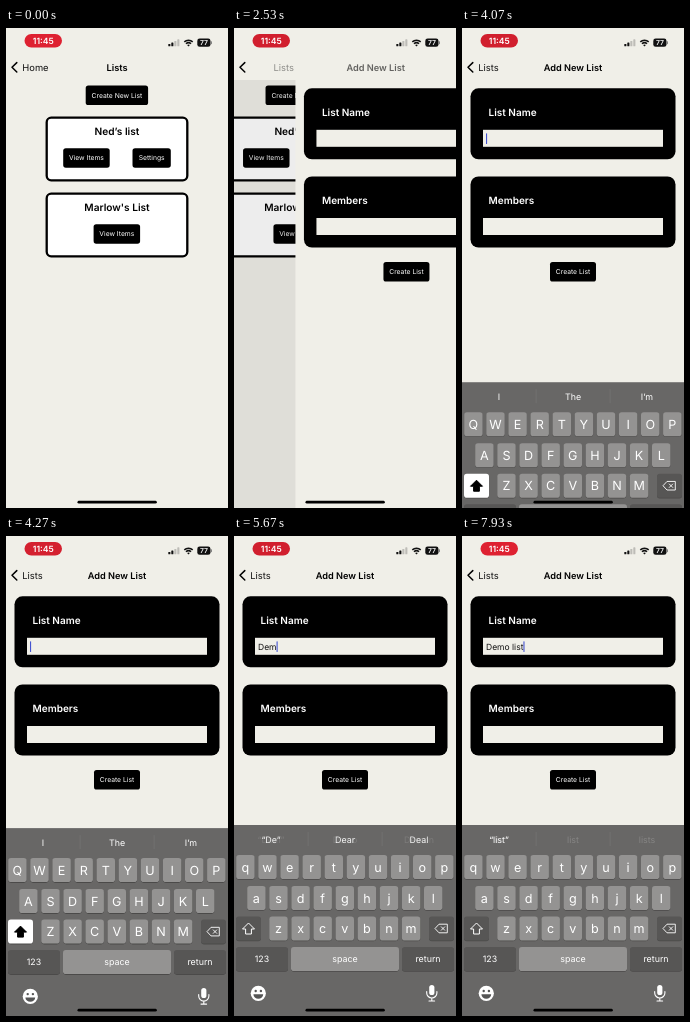
These frames come from a looping animation (222x480 px, 8 s). An HTML page:

```html
<!DOCTYPE html>
<html lang="en">
<head>
<meta charset="utf-8">
<title>Add New List</title>
<style>
  html, body { margin: 0; width: 100%; height: 100%; overflow: hidden; background: #f0efe8; }
  svg { display: block; width: 100vw; height: 100vh; }
  text { font-family: Inter, Roboto, sans-serif; white-space: pre; text-rendering: geometricPrecision; }
</style>
</head>
<body>
<svg id="stage" viewBox="0 0 222 480" preserveAspectRatio="none"></svg>
<script>
const LOOP = 8000, W = 222;
const CREAM = '#f0efe8', KEY = '#949392', DARK_KEY = '#575655';

// Markup helpers
const rect = (x, y, w, h, r, fill, extra = '') =>
  `<rect x="${x}" y="${y}" width="${w}" height="${h}" rx="${r}" fill="${fill}" ${extra}/>`;
const text = (x, y, str, size, fill = '#000', extra = 'text-anchor="middle"') =>
  `<text x="${x}" y="${y}" font-size="${size}" fill="${fill}" ${extra}>${str}</text>`;
const group = (id, body, extra = '') => `<g id="${id}" ${extra}>${body}</g>`;
const BOLD = 'font-weight="600" text-anchor="middle"';

const button = (x, y, w, label) =>
  rect(x, y, w, 19.5, 2.6, '#000') + text(x + w / 2, y + 12.2, label, 6.75, '#fff');
const listCard = (y, title) =>
  rect(40.7, y + 1.2, 140.6, 62.6, 4.5, '#fff', 'stroke="#000" stroke-width="2.3"') +
  text(111, y + 18, title, 10.15, '#000', BOLD);
const fieldCard = (y, title) =>
  rect(8.5, y, 205, 71, 8, '#000') +
  text(26.5, y + 27.4, title, 10, '#fff', 'font-weight="600"') +
  rect(21, y + 41.5, 180, 17, 0, CREAM);

const listsPage =
  rect(0, 0, W, 480, 0, CREAM) +
  group('createButton', button(79.7, 57.5, 62.4, 'Create New List')) +
  listCard(88.5, 'Ned’s list') + button(57.2, 120.2, 46.5, 'View Items') + button(126.5, 120.2, 38.3, 'Settings') +
  listCard(164.5, "Marlow's List") + button(87.6, 196.2, 46.5, 'View Items');

const addPage =
  rect(0, 0, W, 480, 0, CREAM) +
  fieldCard(60.3, 'List Name') + fieldCard(148.5, 'Members') +
  button(88, 234, 46, 'Create List') +
  text(24, 113.8, '', 8.5, '#111', 'id="typed"') +
  rect(24, 105.3, 1.1, 10.8, 0.5, '#4454d0', 'id="caret"');

const navBar =
  rect(0, 0, W, 52, 0, CREAM) +
  '<path d="M10.8 34.6 6 39.3l4.8 4.7" fill="none" stroke="#000" stroke-width="1.5" stroke-linecap="round" stroke-linejoin="round"/>' +
  group('homeLabel', text(16.3, 42.7, 'Home', 9.4, '#111', '')) +
  group('listsLabel', text(16.3, 42.7, 'Lists', 9.4, '#111', '')) +
  group('listsTitle', text(111, 42.7, 'Lists', 9.3, '#000', BOLD)) +
  group('addTitle', text(111, 42.7, 'Add New List', 9.2, '#000', BOLD));

const statusBar =
  rect(18.5, 6, 37.5, 13.6, 6.8, '#d9202f', 'id="pill"') +
  text(37.3, 15.9, '11:45', 8.6, '#fff', BOLD) +
  [2.4, 3.8, 5.4, 7].map((h, i) => rect(162.3 + i * 3, 18.3 - h, 2.1, h, 0.6, i < 2 ? '#111' : '#bdbcb7')).join('') +
  '<path d="M178.3 13.9a6 6 0 0 1 8.4 0M180 15.8a3.6 3.6 0 0 1 5 0" fill="none" stroke="#111" stroke-width="1.5"/>' +
  '<path d="M181.1 17.1a2 2 0 0 1 2.8 0l-1.4 1.4z" fill="#111"/>' +
  rect(191.3, 10.6, 13.2, 8.2, 2.4, '#111') + rect(205, 13.2, 0.9, 3, 0.4, '#777') +
  text(197.9, 17.2, '77', 6.8, '#fff', BOLD);

// Keyboard geometry
const PITCH = 22.1;
const ROWS = [['qwertyuiop', 11.4, 319], ['asdfghjkl', 22.4, 350], ['zxcvbnm', 44.5, 380.5]];
const keys = {};
for (const [letters, x0, y] of ROWS)
  [...letters].forEach((ch, i) => keys[ch] = { x: x0 + i * PITCH, y });

const keyBox = (x, y, w, fill, id = '') =>
  rect(x, y + 0.8, w, 24, 2.8, '#4b4a49') + rect(x, y, w, 24, 2.8, fill, id);
const letterKeys = Object.entries(keys).map(([ch, k]) =>
  keyBox(k.x - 9.2, k.y, 18.4, KEY) + text(k.x, k.y + 16.5, ch, 12.6, '#fff', `text-anchor="middle" data-key="${ch}"`)).join('');
const slots = id => group(id, [37, 111, 185].map(x => text(x, 307, '', 8.9, '#fff')).join(''));

const keyboard =
  rect(0, 289, W, 192, 0, '#686766') +
  rect(73.8, 296, 0.5, 14, 0, '#7c7b7a') + rect(147.8, 296, 0.5, 14, 0, '#7c7b7a') +
  slots('oldWords') + slots('newWords') + letterKeys +
  keyBox(2, 380.5, 25, DARK_KEY, 'id="shiftKey"') +
  '<path id="shiftArrow" d="M14.5 387l-6 6h3.1v5h5.8v-5h3.1z" stroke-width="1" stroke-linejoin="round"/>' +
  keyBox(195, 380.5, 25, DARK_KEY) +
  '<path d="M201 392.5l4-4.3h8.3v8.6H205zM207 390.5l4 4m0-4l-4 4" fill="none" stroke="#fff" stroke-width=".9" stroke-linejoin="round"/>' +
  keyBox(2, 411, 52, DARK_KEY) + text(28, 426.2, '123', 8.8, '#fff') +
  keyBox(57, 411, 108, KEY, 'id="spaceKey"') + text(111, 426, 'space', 8.9, '#fff') +
  keyBox(168, 411, 52, DARK_KEY) + text(194, 426.2, 'return', 8.9, '#fff') +
  '<circle cx="24.3" cy="457.3" r="7.6" fill="#fff"/>' +
  '<circle cx="21.7" cy="455" r="1.2" fill="#555"/><circle cx="26.9" cy="455" r="1.2" fill="#555"/>' +
  '<path d="M19.4 458.3h9.8a4.9 4.4 0 0 1-9.8 0z" fill="#555"/>' +
  rect(195.2, 449, 5.2, 10, 2.6, '#fff') +
  '<path d="M192.7 455.5v1.4a5.1 5.1 0 0 0 10.2 0v-1.4M197.8 462v3m-2.8 0h5.6" fill="none" stroke="#fff" stroke-width="1.1" stroke-linecap="round"/>' +
  group('popup',
    '<path d="M-12 -37H12Q17 -37 17 -32V-10Q17 -6 13 -3Q9.2 0 9.2 4V21Q9.2 24 6.2 24H-6.2Q-9.2 24 -9.2 21V4Q-9.2 0 -13 -3Q-17 -6 -17 -10V-32Q-17 -37 -12 -37Z" fill="#858483" stroke="#747372" stroke-width=".5"/>' +
    text(0, -15, '', 18.5, '#fff'));

document.getElementById('stage').innerHTML =
  group('listsPage', listsPage) + rect(0, 0, W, 480, 0, '#000', 'id="dim"') +
  group('addPage', addPage) + navBar + statusBar + group('keyboard', keyboard) +
  rect(71.5, 472.7, 79.3, 2.9, 1.45, '#000');

// Each stroke: character, press time, release time, suggestions after release
const STROKES = [
  ['D', 4740, 4880, ['“D”', 'Do', 'Did']],
  ['e', 5200, 5300, ['“De”', 'Dear', 'Deal']],
  ['m', 5560, 5660, ['“Dem”', 'Demo', 'Demon']],
  ['o', 6010, 6120, ['“Demo”', '', '']],
  [' ', 6330, 6400, ['of', 'for', 'is']],
  ['l', 6990, 7090, ['“l”', 'list', 'like']],
  ['i', 7240, 7330, ['“li”', 'list', 'like']],
  ['s', 7480, 7570, ['“lis”', 'list', 'lists']],
  ['t', 7740, 7830, ['“list”', '', '']],
];
const PUSH_START = 2350, FOCUS = 3900, KEYBOARD_START = 3935, KEYBOARD_TIME = 450;
const START_WORDS = ['I', 'The', 'I’m'];

const $ = id => document.getElementById(id);
const clamp = v => Math.min(1, Math.max(0, v));
const set = (id, attrs) => { for (const k in attrs) $(id).setAttribute(k, attrs[k]); };
const shift = (id, x, y = 0, opacity = 1) => set(id, { transform: `translate(${x} ${y})`, opacity });
const label = (node, str) => { if (node.textContent !== str) node.textContent = str; };
const spring = ms => {
  const k = Math.max(0, ms) * 0.0141;
  return k > 14 ? 1 : 1 - (1 + k) * Math.exp(-k);
};

function drawPush(t) {
  const p = spring(t - PUSH_START), q = 1 - p;
  shift('listsPage', -0.3 * W * p);
  set('dim', { opacity: p > 0 && p < 1 ? 0.1 * p : 0 });
  shift('addPage', W * q);
  shift('homeLabel', -60 * p, 0, clamp(1 - 2 * p));
  shift('listsTitle', -84 * p, 0, clamp(1 - 1.6 * p));
  shift('listsLabel', 84 * q, 0, clamp(2 * p - 1));
  shift('addTitle', 111 * q, 0, clamp(1.5 * p - 0.5));
  const press = clamp((t - 2130) / 100) * clamp((2500 - t) / 200);
  set('createButton', { opacity: 1 - 0.6 * press });
}

function drawTyping(t) {
  const done = STROKES.filter(s => t >= s[2]);
  const active = STROKES.find(s => t >= s[1] && t < s[2]);
  const upper = !done.length;

  label($('typed'), done.map(s => s[0]).join(''));
  set('caret', { x: 24 + $('typed').getComputedTextLength(), opacity: t >= FOCUS ? 1 : 0 });

  document.querySelectorAll('[data-key]').forEach(node =>
    label(node, upper ? node.dataset.key.toUpperCase() : node.dataset.key));
  set('shiftKey', { fill: upper ? '#fff' : DARK_KEY });
  set('shiftArrow', { fill: upper ? '#000' : 'none', stroke: upper ? '#000' : '#fff' });
  set('spaceKey', { fill: active && active[0] === ' ' ? DARK_KEY : KEY });

  const key = active && keys[active[0].toLowerCase()];
  if (key) {
    shift('popup', key.x, key.y);
    label($('popup').querySelector('text'), active[0]);
  } else set('popup', { opacity: 0 });

  const words = [START_WORDS, ...done.map(s => s[3])];
  const now = words[words.length - 1], before = words[words.length - 2] || ['', '', ''];
  const age = done.length ? t - done[done.length - 1][2] : 1e4;
  now.forEach((w, i) => {
    label($('newWords').children[i], w);
    label($('oldWords').children[i], before[i]);
  });
  set('newWords', { opacity: clamp(age / 85) });
  set('oldWords', { opacity: clamp(1 - age / 125) });
}

function draw(t) {
  drawPush(t);
  drawTyping(t);
  const rise = 1 - (1 - clamp((t - KEYBOARD_START) / KEYBOARD_TIME)) ** 3;
  shift('keyboard', 0, 192 * (1 - rise), rise > 0 ? 1 : 0);
  set('pill', { fill: `hsl(355 74% ${48.5 + 1.5 * Math.cos(t / 1600 * 2 * Math.PI)}%)` });
}

const start = performance.now();
function tick() {
  draw((performance.now() - start) % LOOP);
  requestAnimationFrame(tick);
}
tick();
</script>
</body>
</html>
```
